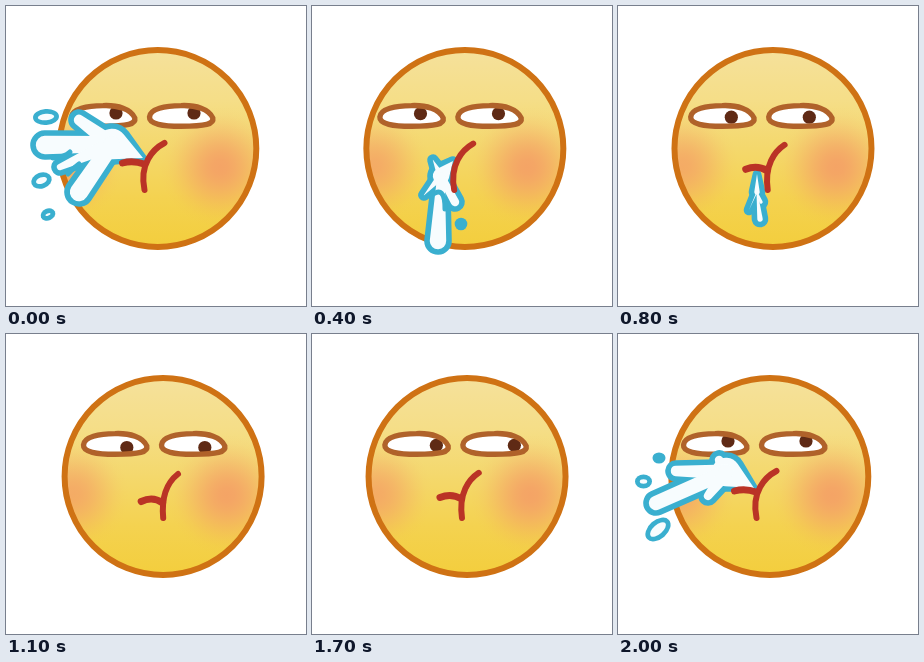
These frames come from a looping animation (300x300 px, 2.1 s). An HTML page with a canvas:

```html
<!DOCTYPE html>
<html lang="en">
<head>
<meta charset="utf-8">
<title>Spitting face</title>
<style>
html, body { margin: 0; width: 100%; height: 100%; overflow: hidden; background: #fff; }
canvas { display: block; width: 300px; height: 300px; }
</style>
</head>
<body>
<canvas id="stage" width="300" height="300"></canvas>
<script>
const ctx = document.getElementById('stage').getContext('2d');
const STEP = 100, STEPS = 21;
const RIM = '#cf7214', LID = '#b0622a', PUPIL = '#5f2a15', LIP = '#ba3326';
const BLUE = '#3aafcf', FOAM = '#f7fcfe', LINE = 5.6;

const clamp = v => Math.min(1, Math.max(0, v));
const mix = (a, b, u) => a + (b - a) * u;
const smooth = u => u * u * (3 - 2 * u);
const mixAll = (a, b, u) => a.map((p, i) => p.map((v, j) => mix(v, b[i][j], u)));

// Head turn, 0 to 1 and back
const turn = t => t < 1300 ? clamp(t / 1100) ** 1.6 : 1 - ((t - 1300) / 700) ** 1.7;

// Pupil offset from the middle of the eye
function gaze(t) {
  if (t >= 1900) return 13;
  if (t < 1200) return 13 - 4.5 * Math.sin(Math.PI * t / 1200);
  return 13 + 7 * clamp((t - 1200) / 500) ** 1.5;
}

// Water is a hub with five arms: circles [x, y, r], hub first, then the mouth end
const dot = (x, y) => Array(6).fill([x, y, 1]);
const jet = [[108, 138, 17], [136, 154, 1], [101, 126, 7], [58, 137, 8], [38, 169, 10], [90, 162, 7]];
const spray = [[106, 138, 18], [137, 152, 1], [73, 114, 8], [39, 139, 12], [54, 161, 6], [73, 186, 12]];
const pour = [[129, 170, 11], [141, 155, 2], [121, 154, 3], [112, 189, 3], [126, 235, 11], [143, 196, 7]];
const drip = [[139, 186, 5.5], [139, 168, 1.5], [139, 172, 2], [131, 204, 2.5], [142, 213, 5.5], [143, 196, 4.5]];
const flow = [[18, dot(136, 155)], [20, jet], [21, spray], [25, pour], [29, drip], [31, dot(142, 170)]];

// Droplets [x, y, rx, ry, angle]
const early = [[41, 124, 6.5, 5.5, 0], [25.5, 147.5, 8.5, 7, 0], [40, 195.5, 14.5, 9.5, -.72]];
const late = [[40, 111, 13, 8, -.08], [35.5, 174.5, 10.5, 8, -.35], [42, 208.5, 7.5, 6, -.4]];

function stroke(color, width) {
  ctx.strokeStyle = color;
  ctx.lineWidth = width;
  ctx.stroke();
}

function oval(x, y, rx, ry, rot, color) {
  ctx.beginPath();
  ctx.ellipse(x, y, rx, ry, rot, 0, 7);
  ctx.fillStyle = color;
  ctx.fill();
}

const disc = (x, y, r, color) => oval(x, y, r, r, 0, color);

function curve(x0, y0, cx, cy, x1, y1, color, width) {
  ctx.beginPath();
  ctx.moveTo(x0, y0);
  ctx.quadraticCurveTo(cx, cy, x1, y1);
  stroke(color, width);
}

// Tapered capsule around two circles
function arm(x0, y0, r0, x1, y1, r1, color) {
  const dir = Math.atan2(y1 - y0, x1 - x0), d = Math.hypot(x1 - x0, y1 - y0) || 1;
  const a = Math.acos(Math.max(-1, Math.min(1, (r0 - r1) / d)));
  ctx.beginPath();
  ctx.arc(x0, y0, r0, dir + a, dir + 2 * Math.PI - a);
  ctx.arc(x1, y1, r1, dir - a, dir + a);
  ctx.fillStyle = color;
  ctx.fill();
}

function splash([[hx, hy, hr], ...tips]) {
  for (const [grow, color] of [[LINE / 2, BLUE], [-LINE / 2, FOAM]]) {
    const size = r => Math.max(0, r + grow);
    tips.forEach(([x, y, r], i) => arm(hx, hy, size(i ? hr * .6 : hr), x, y, size(r), color));
  }
}

function drop(x, y, rx, ry, rot) {
  oval(x, y, rx, ry, rot, BLUE);
  if (rx > 7) oval(x, y, rx - 4.8, ry - 4.8, rot, FOAM);
}

function water(step) {
  const s = step < 18 ? step + STEPS : step;
  if (s > 30 || s < 19) return;
  const i = flow.findIndex(key => key[0] >= s);
  const [s0, a] = flow[i - 1], [s1, b] = flow[i];
  splash(mixAll(a, b, (s - s0) / (s1 - s0)));

  if (s >= 20 && s <= 22) {
    const fall = Math.max(0, s - 21) * 18;
    for (const [x, y, ...rest] of mixAll(early, late, clamp(s - 20))) drop(x, y + fall, ...rest);
  }
  if (s >= 24 && s <= 26) drop(149, 218 + 38 * (s - 25), 6.3, 6.3, 0);
  if (s === 21) {
    curve(47, 152, 59, 151, 64, 146, BLUE, 5);
    curve(62, 168, 66, 163, 73, 158, BLUE, 5);
  }
  if (s === 25) curve(119, 190, 133, 178, 133, 203, BLUE, 5);
}

function blush(x, y, r, alpha) {
  const g = ctx.createRadialGradient(x, y, 0, x, y, r);
  for (let u = 0; u <= 1; u += .125) g.addColorStop(u, `rgba(244,157,102,${alpha * (1 - smooth(u))})`);
  ctx.fillStyle = g;
  ctx.fillRect(x - r, y - r, 2 * r, 2 * r);
}

function face(k) {
  const g = ctx.createLinearGradient(0, 44, 0, 241);
  ['#f5e19b', '#f5de88', '#f4d86c', '#f4d250', '#f3ce3d'].forEach((c, i) => g.addColorStop(i / 4, c));
  ctx.save();
  ctx.beginPath();
  ctx.arc(151.8 + 5.3 * k, 142.5, 98.5, 0, 7);
  ctx.fillStyle = g;
  ctx.fill();
  ctx.save();
  ctx.clip();
  blush(214 + 7 * k, 161, 60, .88);
  blush(61 + 6 * k, 160, 56, .75);
  ctx.restore();
  stroke(RIM, 6);
  ctx.restore();
}

const lid = new Path2D('M-31.5 111C-31 103-16 99.6 0 99.6C15 99 28 103 31.8 112C33 118 25 120.3 0 120.3C-18 120.3-32 118-31.5 111Z');

function eye(x, px, py) {
  ctx.save();
  ctx.translate(x, 0);
  ctx.fillStyle = '#fff';
  ctx.fill(lid);
  ctx.save();
  ctx.clip(lid);
  disc(px, py, 6.6, PUPIL);
  ctx.restore();
  ctx.strokeStyle = LID;
  ctx.lineWidth = 5.4;
  ctx.stroke(lid);
  ctx.restore();
}

function mouth(k, lip) {
  ctx.beginPath();
  ctx.moveTo(158.5 + 13.5 * k, 137 + 3 * k);
  ctx.bezierCurveTo(147 + 16 * k, 143 + 4 * k, 133 + 22 * k, 158 + 2 * k, 138.5 + 18.7 * k, 184);
  stroke(LIP, 6);
  if (lip) curve(116.5 + 18.7 * k, 157 + 10.5 * k, 127 + 20 * k, 154 + 8 * k, 138 + 18.5 * k, 158 + 11 * k, LIP, 7);
}

function draw(step) {
  const t = step * STEP, k = turn(t);
  const ex = 97 + 12 * k, px = gaze(t), py = 107 + 6.5 * smooth(k);
  ctx.fillStyle = '#fff';
  ctx.fillRect(0, 0, 300, 300);
  face(k);
  eye(ex, px, py);
  eye(ex + 78, px, py);
  water(step);
  mouth(k, step < 2 || step > 5);
}

ctx.lineCap = ctx.lineJoin = 'round';
const start = performance.now();
function tick() {
  draw(Math.floor((performance.now() - start) / STEP) % STEPS);
  requestAnimationFrame(tick);
}
tick();
</script>
</body>
</html>
```
